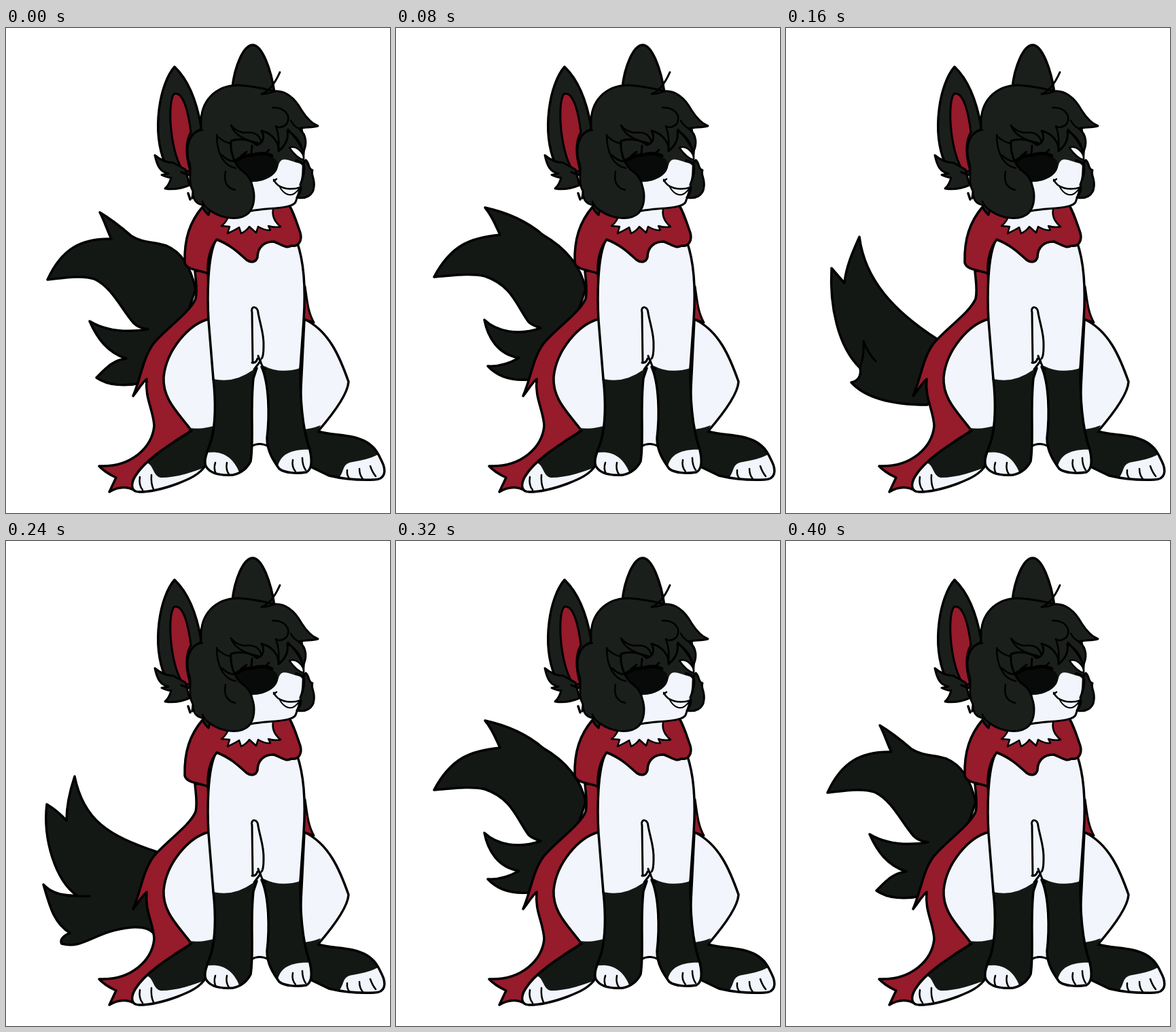
Recreate the animation shown at these times as an HTML page with a canvas. Size 565x713 px, loop 480 ms.

```html
<!DOCTYPE html>
<html lang="en">
<head>
<meta charset="utf-8">
<title>Tail wag</title>
<style>
html, body { margin: 0; width: 100%; height: 100%; overflow: hidden; background: #fff; }
canvas { display: block; }
</style>
</head>
<body>
<canvas id="stage" width="565" height="713"></canvas>
<script>
const ctx = document.getElementById('stage').getContext('2d');
const INK = '#000', FUR = '#131814', HAIR = '#1b1f1c', MASK = '#080a09';
const RED = '#961b2b', PALE = '#f2f5fb';
const STEP = 80;
const ORDER = [0, 1, 2, 3, 1, 0];

ctx.lineJoin = 'round';
ctx.lineCap = 'round';

function fill(d, color) {
  ctx.fillStyle = color;
  ctx.fill(new Path2D(d));
}

function line(d, width = 3.5) {
  ctx.strokeStyle = INK;
  ctx.lineWidth = width;
  ctx.stroke(new Path2D(d));
}

function shape(d, color, width = 3.5) {
  fill(d, color);
  line(d, width);
}

// Fill a colour patch limited to an outline.
function patch(outline, d, color) {
  ctx.save();
  ctx.clip(new Path2D(outline));
  fill(d, color);
  ctx.restore();
}

const TAILS = [
  {
    body: 'M279 384C272 352 258 329 236 320C217 314 201 316 185 306C171 294 155 281 138 271' +
      'C145 284 149 298 155 310C111 309 82 324 61 370C88 367 112 363 130 369' +
      'C157 382 170 414 188 434C194 440 202 442 209 443C177 448 148 446 123 431' +
      'C134 456 149 477 177 486C157 488 147 500 133 514C150 526 176 527 198 522L250 470Z'
  },
  {
    body: 'M279 384C273 352 251 324 216 304C194 285 163 271 131 264C142 277 147 291 153 304' +
      'C110 308 81 319 56 366C84 364 108 360 131 365C170 378 178 409 195 432C200 437 206 439 213 441' +
      'C180 453 148 446 130 429C135 455 150 480 181 485C165 494 150 498 135 497' +
      'C149 512 168 519 195 517L250 470Z'
  },
  {
    body: 'M222 457C160 417 116 371 108 307C98 329 88 352 86 375L67 353' +
      'C64 408 76 468 109 500C111 510 107 519 96 521C116 543 154 554 208 554L250 500Z',
    crease: 'M109 499C113 488 115 474 114 460C119 473 125 483 132 490'
  },
  {
    body: 'M222 457C150 433 114 410 101 346C93 370 89 390 89 411C80 401 70 393 60 387' +
      'C54 439 73 499 104 521C84 522 67 518 55 505C64 535 70 562 94 576' +
      'C83 581 79 587 82 592C115 601 130 573 185 568C202 567 212 570 218 578L250 500Z',
    crease: 'M92 522C103 521 113 523 123 522'
  }
];

function drawTail(tail) {
  shape(tail.body, FUR);
  if (tail.crease) line(tail.crease, 3);
}

function drawCape() {
  shape('M278 357C279 370 282 386 279 398C270 419 236 441 217 464C201 486 199 513 187 541' +
    'C194 533 199 523 207 516C204 544 217 562 218 585C215 616 185 646 137 644' +
    'C145 653 154 657 162 661C158 669 155 676 152 682C165 674 177 673 190 680' +
    'L273 592L300 428L297 357Z', RED);
  shape('M440 380C443 400 444 417 453 433L438 428Z', RED, 3);
}

function drawHaunches() {
  const thighL = 'M298 428C268 436 236 474 232 513C230 546 254 566 273 592L310 610L310 428Z';
  fill(thighL, PALE);
  line(thighL);
  const thighR = 'M439 428C475 445 491 483 504 520C503 537 485 563 459 593L430 610Z';
  fill(thighR, PALE);
  line(thighR);

  const left = 'M273 592C250 607 206 632 190 659C183 671 184 682 196 682C216 682 233 677 252 670' +
    'C270 663 286 656 294 642L312 590Z';
  fill(left, FUR);
  patch(left, 'M175 632L207 639C218 643 216 659 228 661C252 661 275 653 300 643V690H175Z', PALE);
  line(left);
  line('M197 660Q195 672 201 679M214 657Q213 670 217 678', 2.5);
  fill('M270 588Q290 591 311 583V606H262Z', FUR);
  line('M273 592L249 607');

  const right = 'M459 593C483 600 508 596 531 609C545 618 548 627 553 637C560 651 558 664 542 664' +
    'C519 665 496 663 475 658L448 645L434 600Z';
  fill(right, FUR);
  patch(right, 'M485 668C501 651 492 641 510 638C528 635 541 631 549 626L575 635V675H485Z', PALE);
  line(right);
  line('M502 650Q501 658 506 663M520 648Q520 657 525 663M536 644Q539 653 544 659', 2.5);
  fill('M434 590Q448 590 463 584L457 596L470 602H434Z', FUR);
}

function drawBody() {
  fill('M309 311C296 336 296 397 298 430L305 530H364L361 614Q373 608 386 614L380 520' +
    'H433L439 429C442 385 439 345 428 314L395 305Z', PALE);
  line('M361 615Q373 608 386 615', 3);

  const left = 'M305 516C309 550 308 585 302 606C297 621 290 635 294 644C301 657 319 658 334 657' +
    'C348 654 355 647 360 637C365 604 359 561 364 515L369 500';
  fill(left + 'L363 503Q335 523 305 516Z', FUR);
  patch(left + 'Z', 'M285 627C314 618 337 627 347 665H285Z', PALE);
  line(left);
  line('M308 639Q305 648 309 655M325 639Q323 649 328 656', 2.5);

  const right = 'M376 498C387 522 388 570 384 603C384 622 394 637 402 648C411 655 430 655 442 653' +
    'C451 648 450 633 447 620C435 586 433 542 433 500';
  fill(right + 'Q403 509 380 497Z', FUR);
  patch(right + 'Z', 'M399 652C400 628 417 618 452 620V660H399Z', PALE);
  line(right);
  line('M422 635Q420 645 426 652M436 632Q436 643 441 650', 2.5);

  line('M309 311C296 336 296 397 298 430L305 516');
  line('M428 314C439 345 441 385 438 429L433 500');

  line('M363 492L362 418C359 408 371 408 371 419C374 436 380 450 379 468Q379 483 376 486' +
    'M362 492Q368 493 370 486M371 482L374 490L365 502M374 488Q376 498 382 502', 3);
}

function drawCollar() {
  shape('M290 262C270 285 262 311 263 345C266 356 283 355 297 361C296 340 300 324 310 311' +
    'C329 318 342 330 354 341C361 346 368 344 370 337C370 322 380 314 394 314' +
    'C405 318 412 325 420 320C431 322 436 312 433 301C428 287 424 273 417 261Z', RED);
  shape('M330 270C327 280 323 287 317 291L329 292L326 302Q337 297 343 293L346 302' +
    'Q354 298 358 292L368 301L371 292Q381 298 389 297L386 291Q396 294 404 292' +
    'C394 284 390 275 394 262Z', PALE, 2.5);
}

function drawEars() {
  shape('M333 88C336 58 349 25 363 25C377 25 390 61 395 95Z', HAIR);
  shape('M234 199C214 151 226 82 248 57C270 78 281 110 287 145L278 215L258 216Z', HAIR);
  shape('M262 211C243 190 236 113 247 97C262 92 269 129 272 153C262 170 266 193 271 210Z', RED, 3);
  shape('M246 198C234 198 226 193 219 187C222 202 227 212 239 214L229 216Q237 220 243 220' +
    'C241 227 239 232 234 236C245 238 258 236 270 231L264 208Z', HAIR, 3);
  line('M258 212L268 216M268 243L271 252M276 238L274 250');
}

function drawFace() {
  shape('M330 150L432 150L438 184L437 208C437 222 432 240 426 256C421 266 387 264 360 269L335 230Z', PALE, 3);
  fill('M320 140H436L440 180L437 200C424 198 412 191 406 194C401 197 401 203 398 210' +
    'C391 222 372 228 350 226L325 215Z', HAIR);
  fill('M333 198C348 185 378 183 393 190C402 196 402 204 397 211C387 224 367 229 351 225Z', MASK);
  shape('M417 176C427 172 439 183 438 194C430 192 424 186 417 176Z', '#fff', 2.5);
  line('M427 195Q434 196 438 202', 4);
  // Closed eye
  line('M333 198C344 192 350 186 362 187C374 183 383 184 391 188', 5);
  line('M346 188L354 182M361 185L362 173M382 184L387 179', 3);
  // Smile
  line('M394 223C399 235 416 240 434 234', 2.5);
  line('M403 234C408 243 418 250 427 241Q431 238 432 234', 2);
  line('M394 225L398 222', 2.5);
  shape('M441 194C447 199 444 207 451 209C448 216 455 221 453 234C452 246 441 252 428 249' +
    'C434 242 435 236 433 230C438 219 440 207 438 199Z', HAIR, 3);
}

function drawHair() {
  shape('M287 141C286 108 307 85 341 84C357 85 374 87 394 93C414 91 427 107 435 121' +
    'C442 132 449 140 459 144C449 147 440 145 431 148C443 157 443 172 437 183' +
    'C434 168 425 157 414 151C416 163 411 173 401 181C402 168 392 155 376 151' +
    'C382 162 377 170 369 172C358 163 343 162 331 166C330 181 334 195 344 207' +
    'C350 212 359 217 362 231C367 245 366 262 357 272C346 283 319 282 300 268' +
    'L298 275C291 268 290 266 289 260C277 258 275 249 275 240C266 225 275 207 269 196' +
    'C263 174 270 154 287 149Z', HAIR, 3);
  line('M376 97Q391 92 403 65M376 97Q386 97 395 93', 3);
  line('M310 157C310 185 321 203 338 206M310 158Q318 167 331 170M318 187Q327 196 335 196', 2.5);
  line('M331 143C336 157 351 165 371 169M331 143Q338 152 350 154C366 152 373 157 376 168', 2.5);
  line('M392 117C410 116 420 129 413 141C407 147 399 147 397 144Q403 160 401 180', 2.5);
  line('M415 149C421 157 429 163 437 181M419 136Q423 144 431 148', 2.5);
  line('M289 150Q280 151 273 158M323 211C320 226 325 235 337 238M300 268Q292 263 289 255', 2.5);
}

function draw(now) {
  const pose = ORDER[Math.floor(now / STEP) % ORDER.length];
  ctx.fillStyle = '#fff';
  ctx.fillRect(0, 0, 565, 713);
  drawTail(TAILS[pose]);
  drawCape();
  drawHaunches();
  drawBody();
  drawCollar();
  drawEars();
  drawFace();
  drawHair();
}

let start;
function tick(now) {
  start ??= now;
  draw(Math.max(0, now - start));
  requestAnimationFrame(tick);
}
draw(0);
requestAnimationFrame(tick);
</script>
</body>
</html>
```
